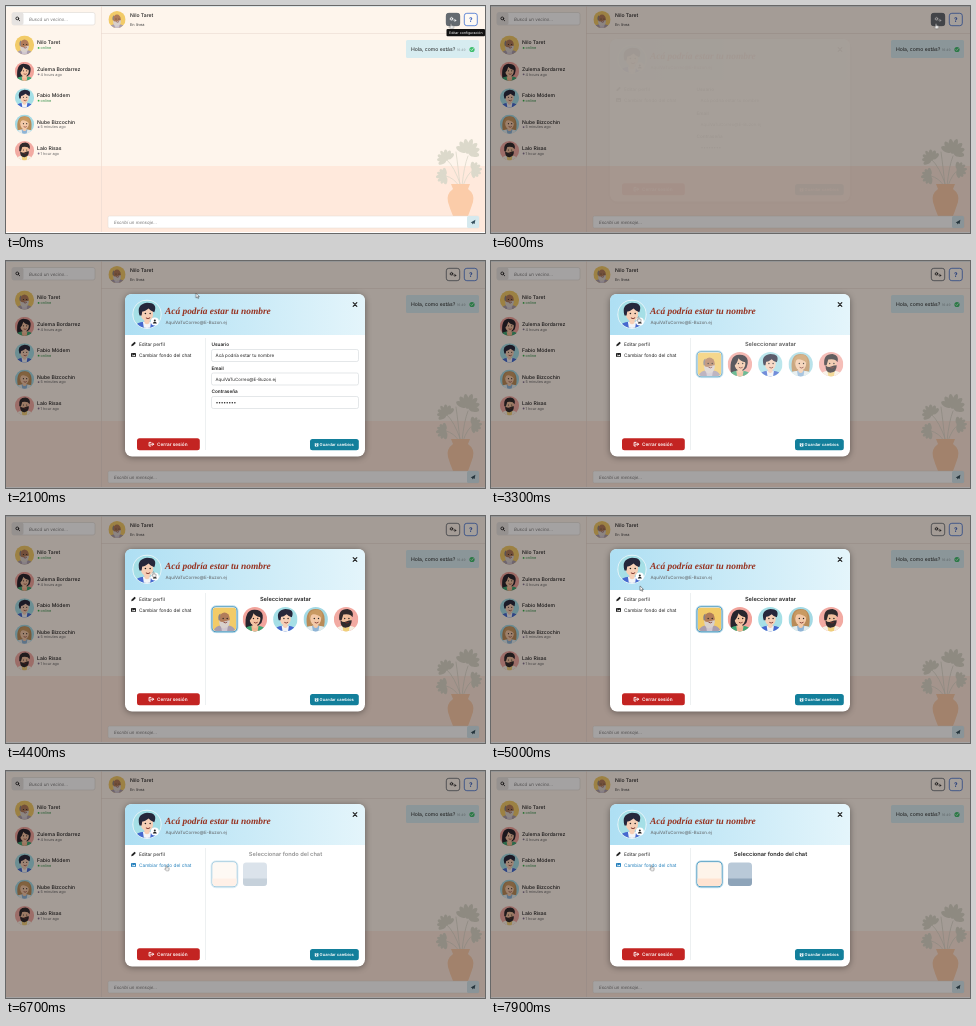
Write an HTML page that moves like this. It is 479x227 px and loops after 8 s.

```html
<!DOCTYPE html>
<html lang="es">
<head>
<meta charset="utf-8">
<title>Chat</title>
<style>
  html, body { margin: 0; width: 100%; height: 100%; overflow: hidden; background: #fff; }
  svg { display: block; width: 100%; height: 100%; }
  text { font-family: Inter, Arial, sans-serif; text-rendering: geometricPrecision; fill: #222; }
  .script { font-family: "Liberation Serif", "Noto Serif", serif; font-style: italic; font-weight: 700; fill: #963220; }
  .line { fill: none; stroke: currentColor; stroke-linecap: round; stroke-linejoin: round; }
  .card { filter: drop-shadow(0 1px 3px rgba(0, 0, 0, .4)); }
  #profileLink, #wallpaperLink { color: #222; }
  #profileLink text, #wallpaperLink text { fill: currentColor; }
</style>
</head>
<body>
<svg id="stage" viewBox="0 0 479 227" preserveAspectRatio="none"></svg>
<script>
const LOOP = 8000;
const INK = '#222';

const rect = (x, y, w, h, fill, r = 0, extra = '') =>
  `<rect x="${x}" y="${y}" width="${w}" height="${h}" rx="${r}" fill="${fill}" ${extra}/>`;
const text = (x, y, size, str, extra = '') =>
  `<text x="${x}" y="${y}" font-size="${size}" ${extra}>${str}</text>`;
const path = (d, fill, extra = '') => `<path d="${d}" fill="${fill}" ${extra}/>`;
const dot = (x, y, r, fill, extra = '') => `<circle cx="${x}" cy="${y}" r="${r}" fill="${fill}" ${extra}/>`;
const at = (x, y, body, scale = 1) => `<g transform="translate(${x} ${y}) scale(${scale})">${body}</g>`;

// Portraits live in a 20 x 20 box centred on the origin.
const shoulders = (color, shirt = color) =>
  path('M-9 11Q-8 4-2 4H2Q8 4 9 11Z', color) + path('M-2.6 4H2.6L1.5 11H-1.5Z', shirt);
const head = skin => rect(-1.7, 1, 3.4, 4.5, skin, 1.5) + `<ellipse cy="-1" rx="3.9" ry="4.7" fill="${skin}"/>`;
const features = dot(-1, -1.2, .5, INK) + dot(2, -1.2, .5, INK) +
  `<path d="M-.5 1.7Q.7 2.6 1.8 1.6" class="line" stroke-width=".6" color="#7a3028"/>`;
const portraits = [
  ['#f2cb68', shoulders('#a99dad', '#cfc5cf') + head('#b17c5a') +
    path('M-4 0Q-3 2 0 1T4 0Q4 5.5 0 6T-4 0Z', '#d8d0cc') +
    path('M-4.4 0Q-5.2-4-3-5Q-3.4-2-3.2 0Z', '#8b8083') + features],
  ['#f2a49c', path('M-6.5 6Q-8-8 0-7.5T4.6 2L0 6Z', '#27252d') + shoulders('#3fa674', '#f2b894') + head('#f4c3a2') +
    path('M-4.5 1Q-5-8 1-7Q5-6 4.4-2Q0-3-1-5Q-2-1-4.5 1Z', '#27252d') + features],
  ['#a5dfe6', shoulders('#4568cf', '#f2f4f7') + head('#f6cfb6') +
    path('M-4.7 0Q-7-7 0-8Q7-8 4.6-2Q2-3 1-4.3Q-2-2-3-2.5L-3.4 0Z', '#26273b') + features],
  ['#a3d9e4', path('M-6.2 4.5Q-8-8 0-8T6 4.5Z', '#b98b58') + shoulders('#e3ebec', '#8fb4d6') + head('#f3c9a8') +
    path('M-4.6 0Q-4-5 0-4T4.6 0Q6-8 0-7.5T-4.6 0Z', '#c99a62') + features],
  ['#f2aaa2', shoulders('#f6efe2', '#f0cf7a') + head('#f0bf9c') +
    path('M-4 0Q-2 2 0 1T4 0Q4 5 0 5.3T-4 0Z', '#302a2c') +
    path('M-4.8 0Q-6-8 1-8Q6-7 4.6-2Q3-5-2-4L-3.2 0Z', '#302a2c') + features]
];
const portrait = (i, x, y, r, clip = 'round') => at(x, y,
  `<g clip-path="url(#${clip})">${rect(-10, -10, 20, 20, portraits[i][0])}${at(0, .8, portraits[i][1], 1.15)}</g>`, r / 10);

const icons = {
  search: `<g class="line" stroke-width=".9"><circle cx="-.4" cy="-.4" r="1.4"/><path d="M.7.7L2 2"/></g>`,
  gear: `<circle r="1.3" class="line" stroke-width="1"/>
    <circle r="2" class="line" stroke-width=".7" stroke-dasharray=".5 1.07" style="stroke-linecap:butt"/>`,
  plane: path('M-2.3.4L2.4-2.2L1.6 2L0 1.2L-1 2.4V1Z', '#35505e'),
  pencil: path('M-2.3 2.3L-1.8.4L1-2.3L2.4-.9L-.4 1.8Z', 'currentColor'),
  image: rect(-2.5, -2, 5, 4, 'currentColor', .7) + path('M-1.8 1.3L-.6-.1L.1.5L1-.6L1.9 1.3Z', '#fff') + dot(-1.1, -.9, .4, '#fff'),
  exit: `<path d="M-.6-1.8H-2.2V1.8H-.6M-.8 0H2.3M1-1.3L2.3 0L1 1.3" class="line" stroke-width=".9" color="#fff"/>`,
  save: rect(-1.8, -1.8, 3.6, 3.6, '#fff', .5) + rect(-1.1, -1.3, 2, 1, '#137f9b') + dot(0, .8, .6, '#137f9b'),
  person: dot(0, -.9, 1, INK) + path('M-2 2Q-1.8.3 0 .3T2 2Z', INK)
};
const gears = at(-1.5, -.7, icons.gear, .85) + at(1.9, .9, icons.gear, .6);

const contacts = [
  ['Nilo Taret', 'online'],
  ['Zulema Bordarrez', '4 hours ago'],
  ['Fabio Módem', 'online'],
  ['Nube Bizcochin', '5 minutes ago'],
  ['Lalo Risas', '1 hour ago']
];
const mail = 'AquíVaTuCorreo@E-Buzon.ej';

const contactList = contacts.map(([name, status], i) => {
  const y = 39 + 26.4 * i;
  const on = status === 'online';
  return portrait(i, 18.5, y, 9.6) + text(31, y - .6, 5.1, name, 'font-weight="500"') +
    dot(32.6, y + 2.9, .9, on ? '#35b34a' : '#81708f') +
    text(34.5, y + 4.2, 3.8, status, `style="fill:${on ? '#35904a' : '#666'}"`);
}).join('');

const leaf = (x, y, turn, size) => {
  const blades = [-80, -52, -26, 0, 26, 52, 80].map(a =>
    `<ellipse cy="-5" rx="1.9" ry="${5.6 - Math.abs(a) / 45}" transform="rotate(${a})"/>`).join('');
  return `<g transform="translate(${x} ${y}) rotate(${turn}) scale(${size})" fill="#dcd9cb">${blades}</g>`;
};
const plant =
  `<path d="M454 180Q452 160 450 146M455 180Q448 160 441 154M456 180Q458 160 462 150M457 180Q461 168 467 164M453 180Q448 172 440 170" class="line" color="#dcd9cb" stroke-width=".8"/>` +
  leaf(441, 154, -35, 1.05) + leaf(461, 147, 20, 1.4) + leaf(466, 164, 85, .95) + leaf(440, 170, -95, .95) +
  path('M445 178H464L462 183Q469 188 467 196Q464 205 462 210H447Q444 203 442 196Q440 188 447 183Z', '#fbcca9');

const chat =
  rect(0, 0, 479, 160, '#fef5ec') + rect(0, 160, 479, 66, '#ffe9dc') +
  rect(0, 0, 479, .7, '#d9e4e8') + rect(95, 0, .7, 226, '#ecdbd2') + rect(95, 27, 384, .6, '#ecdbd2') +
  plant +
  rect(6, 6.5, 83, 12.5, '#fff', 2, 'stroke="#ddd8d4" stroke-width=".6"') +
  rect(6, 6.5, 11.5, 12.5, '#e6e3e1', 2) + at(11.7, 12.8, icons.search) +
  text(23, 14.6, 4.5, 'Buscá un vecino...', 'style="fill:#777;font-style:italic"') +
  contactList +
  portrait(0, 111, 13.5, 8.6) + text(124, 10.8, 5.1, contacts[0][0], 'font-weight="500"') +
  text(124, 19.5, 3.9, 'En línea', 'style="fill:#444"') +
  rect(440.3, 7.3, 13.4, 12.4, 'none', 2.5, 'stroke="#5c636a" stroke-width=".8"') + at(447, 13.5, gears) +
  `<g id="hover" color="#fff">${rect(440, 7, 14, 13, '#646a70', 2.5)}${at(447, 13.5, gears)}</g>` +
  rect(458.3, 7.3, 13, 12.4, '#fff', 2.5, 'stroke="#3f6fd0" stroke-width=".8" fill-opacity=".4"') +
  text(464.8, 15.8, 6.4, '?', 'font-weight="700" text-anchor="middle" style="fill:#2b57bd"') +
  rect(400, 34, 73, 18, '#d7ecf0', 1.5) + text(405, 44.6, 5.1, 'Hola, como estás?') +
  text(451, 44.8, 3.3, '16:49', 'style="fill:#8b979b"') +
  dot(466, 43.5, 2.6, '#3dbd6c') + `<path d="M464.8 43.5l.9 1l1.6-2" class="line" color="#fff" stroke-width=".6"/>` +
  rect(102, 210, 371, 12, '#fff', 1.5, 'stroke="#e2d8d2" stroke-width=".5"') +
  text(108, 217.7, 4.4, 'Escribí un mensaje...', 'style="fill:#777;font-style:italic"') +
  rect(461, 210, 12, 12, '#d5e9ee', 1.5) + at(467, 216, icons.plane);

const field = (y, label, value) =>
  text(205.5, y - 3.4, 4.7, label, 'font-weight="600"') +
  rect(205.5, y, 147, 12, '#fff', 1.8, 'stroke="#d8dde0" stroke-width=".7"') + value;
const profileForm =
  field(88.5, 'Usuario', text(209.5, 96.2, 4.55, 'Acá podría estar tu nombre')) +
  field(112, 'Email', text(209.5, 119.7, 4.4, mail)) +
  field(135.5, 'Contraseña', [...Array(8).keys()].map(i => dot(211 + i * 2.55, 141.8, .75, INK)).join(''));

const heading = str => text(279.5, 85.4, 5.7, str, 'font-weight="600" text-anchor="middle"');
const chosen = (x, y, size) =>
  rect(x - .9, y - .9, size + 1.8, size + 1.8, 'none', 4.6, 'stroke="#b9dced" stroke-width="1"') +
  rect(x, y, size, size, '#fff', 4, 'stroke="#4796bd" stroke-width="1.1"');
const avatarPicker = heading('Seleccionar avatar') + chosen(206, 90.7, 25) +
  portraits.map((_, i) => portrait(i, 218.5 + 30.4 * i, 103.2, i ? 12.2 : 11.7, i ? 'round' : 'soft')).join('');
const swatch = (x, top, bottom) =>
  rect(x, 91.5, 24, 23.5, top, 3.4) + path(`M${x} 107.5h24v4q0 3.5-3.5 3.5h-17q-3.5 0-3.5-3.5Z`, bottom);
const wallpaperPicker = heading('Seleccionar fondo del chat') + chosen(206, 90.8, 25) +
  swatch(206.5, '#fef4ea', '#ffe3d1') + swatch(237, '#b9c9d8', '#8ea4b9');

const menuItem = (id, y, icon, label) =>
  `<g id="${id}">${at(127.5, y, icons[icon])}${text(133, y + 1.7, 4.75, label)}</g>`;
const modal =
  rect(119, 33, 240, 162.5, '#fff', 7, 'class="card"') +
  path('M119 74V40Q119 33 126 33H352Q359 33 359 40V74Z', 'url(#sky)') +
  dot(141, 53.3, 14.6, '#eaf5fa') + portrait(2, 141, 53.3, 13.8) +
  dot(148.8, 60.5, 4, '#fff') + at(148.8, 60.4, icons.person) +
  text(159, 52.6, 9.4, 'Acá podría estar tu nombre', 'class="script"') +
  text(159.5, 62.8, 4.4, mail, 'font-weight="500" style="fill:#6b7175"') +
  `<path d="M347.2 41.7L350.8 45.3M350.8 41.7L347.2 45.3" class="line" stroke-width="1.2"/>` +
  rect(199, 77, .6, 112, '#e2e6e8') +
  menuItem('profileLink', 83, 'pencil', 'Editar perfil') +
  menuItem('wallpaperLink', 94, 'image', 'Cambiar fondo del chat') +
  `<g id="form">${profileForm}</g><g id="avatars">${avatarPicker}</g><g id="wallpapers">${wallpaperPicker}</g>` +
  rect(131, 177.2, 62.8, 12, '#c32422', 2.5) + at(145.3, 183.2, icons.exit) +
  text(151, 185, 4.7, 'Cerrar sesión', 'font-weight="600" style="fill:#fff"') +
  rect(304, 178, 48.8, 11.2, '#137f9b', 2.5) + at(310.6, 183.7, icons.save) +
  text(313.6, 185.2, 4.15, 'Guardar cambios', 'font-weight="600" style="fill:#fff"');

const outline = 'stroke="#222" stroke-width=".45" stroke-linejoin="round"';
const cursor =
  `<g id="hand">${at(0, 0, path('M-.6.4Q0-.5.6.4V2.2L2.7 2.8Q3.3 3 3.1 4L2.5 6H-.4L-2.2 3.8Q-2 2.8-.6 3.9Z', '#fff', outline), .85)}</g>` +
  `<g id="arrow">${path('M0 0V4.8L1.2 3.8L2 5.5L2.8 5.1L2 3.5H3.5Z', '#fff', outline)}</g>`;

document.getElementById('stage').innerHTML = `
  <defs>
    <clipPath id="round"><circle r="10"/></clipPath>
    <clipPath id="soft"><rect x="-10" y="-10" width="20" height="20" rx="2.8"/></clipPath>
    <linearGradient id="sky">
      <stop stop-color="#aedff3"/><stop offset="1" stop-color="#e4f5fb"/>
    </linearGradient>
  </defs>
  <g color="${INK}">${chat}</g>
  <g id="tip">${rect(440.5, 23, 38.5, 7.2, '#111', 1)}
    ${text(459.8, 27.9, 3.5, 'Editar configuración', 'text-anchor="middle" style="fill:#fff"')}</g>
  <rect id="shade" width="479" height="227" fill="#0a0505" fill-opacity=".37"/>
  <g id="modal" color="${INK}">${modal}</g>
  <g id="cursor">${cursor}</g>`;

// Steps are [ms, value, easing towards the next step].
const HOLD = 'steps(1, end)';
function play(id, prop, steps) {
  const frames = [...steps, [LOOP, steps.at(-1)[1]]].map(([ms, value, easing = 'linear']) =>
    ({ offset: ms / LOOP, [prop]: value, easing }));
  document.getElementById(id).animate(frames, { duration: LOOP, iterations: Infinity }).startTime = 0;
}
const move = (x, y) => `translate(${x}px, ${y}px)`;
const BLUE = '#2580bd';

play('tip', 'opacity', [[0, 1], [320, 1], [450, 0]]);
play('hover', 'opacity', [[0, 1, HOLD], [700, 0]]);
play('shade', 'opacity', [[0, 0], [300, 0, 'ease-out'], [560, 1]]);
play('modal', 'opacity', [[0, 0], [595, 0], [780, 1]]);
play('form', 'opacity', [[0, 1, HOLD], [3150, 0, HOLD], [5350, 0], [5550, 1, HOLD], [6600, 0]]);
play('avatars', 'opacity', [[0, 0], [3150, 0], [3350, 1, HOLD], [5350, 0]]);
play('wallpapers', 'opacity', [[0, 0], [6600, 0], [6800, 1]]);
play('profileLink', 'color', [[0, INK, HOLD], [5150, BLUE, HOLD], [6000, INK]]);
play('wallpaperLink', 'color', [[0, INK, HOLD], [6050, BLUE]]);
play('hand', 'opacity', [[0, 1, HOLD], [1250, 0, HOLD], [2450, 1, HOLD], [4850, 0, HOLD], [5150, 1]]);
play('arrow', 'opacity', [[0, 0, HOLD], [1250, 1, HOLD], [2450, 0, HOLD], [4850, 1, HOLD], [5150, 0]]);
play('cursor', 'transform', [
  [0, move(445, 17.5)], [1150, move(445, 17.5), 'ease-in-out'],
  [2100, move(190, 32), 'ease-out'], [2600, move(147.5, 56)],
  [4750, move(147.5, 56), 'ease-in-out'], [5250, move(150.5, 83.5)],
  [5800, move(150.5, 83.5), 'ease-in-out'], [6250, move(160.5, 94.5)]
]);
</script>
</body>
</html>
```
